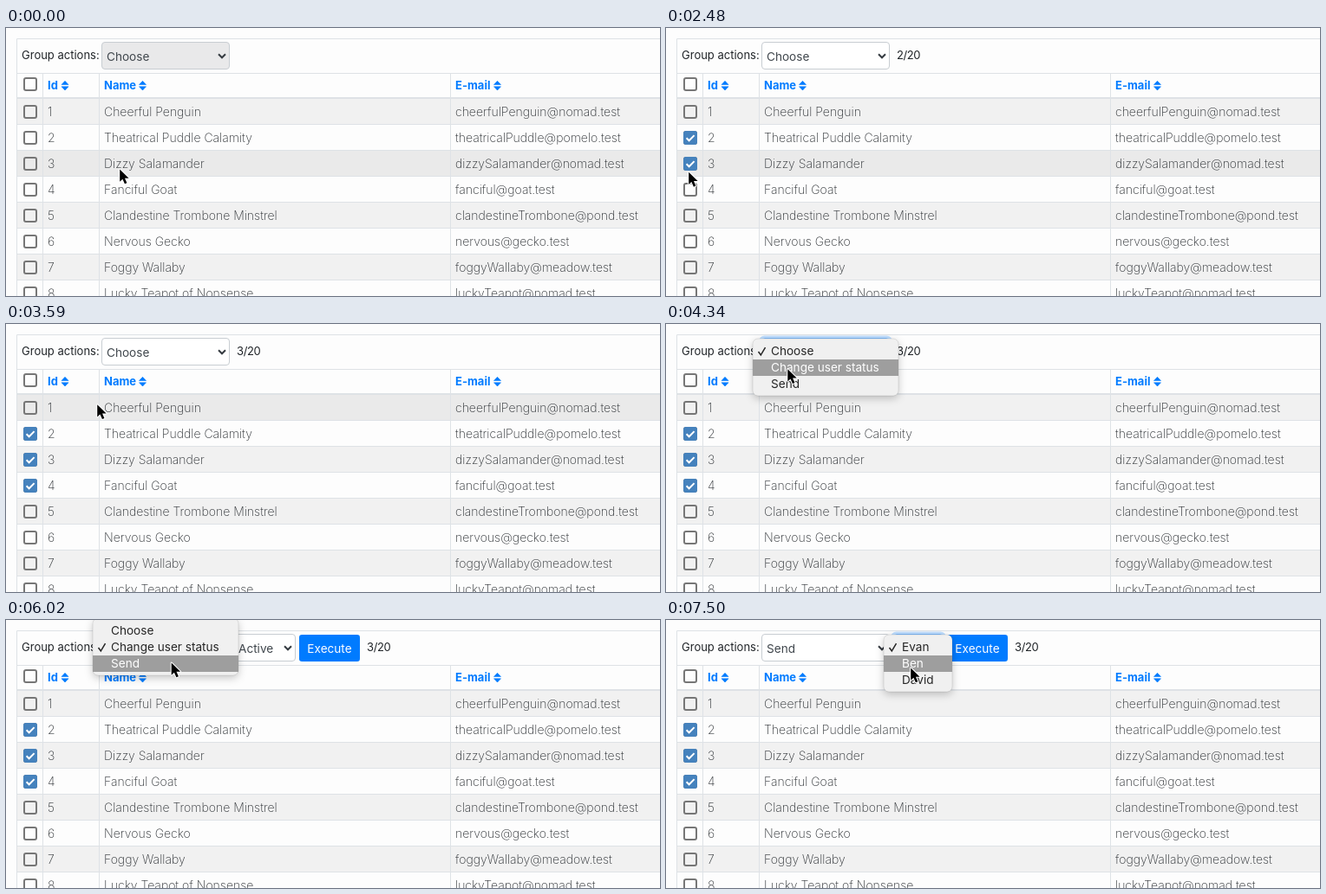
Recreate the animation shown at these times as an HTML page. Size 754 by 310 pixels, loop 8000 ms.

```html
<!DOCTYPE html>
<html lang="en">
<head>
<meta charset="utf-8">
<title>Group actions</title>
<style>
html, body { margin: 0; width: 100%; height: 100%; overflow: hidden; background: #fdfdfd; }
svg { display: block; width: 754px; height: 310px; font: 13.6px Inter, sans-serif; fill: #212529; }
.cell { font-size: 14px; font-weight: 200; fill: #2b2f33; }
.head { font-size: 13px; font-weight: 700; fill: #007bff; }
.label { font-size: 13px; }
.count { font-size: 13px; letter-spacing: -.4px; }
.field { fill: #40474d; }
.menu { filter: drop-shadow(0 3px 5px rgba(0, 0, 0, .22)); }
</style>
</head>
<body>
<svg id="stage" viewBox="0 0 754 310"></svg>
<script>
const LOOP = 8000;
const stage = document.getElementById('stage');

const rows = [
  ['Cheerful Penguin', 'cheerfulPenguin@nomad.test'],
  ['Theatrical Puddle Calamity', 'theatricalPuddle@pomelo.test'],
  ['Dizzy Salamander', 'dizzySalamander@nomad.test'],
  ['Fanciful Goat', 'fanciful@goat.test'],
  ['Clandestine Trombone Minstrel', 'clandestineTrombone@pond.test'],
  ['Nervous Gecko', 'nervous@gecko.test'],
  ['Foggy Wallaby', 'foggyWallaby@meadow.test'],
  ['Lucky Teapot of Nonsense', 'luckyTeapot@nomad.test']
];
const actions = ['Choose', 'Change user status', 'Send'];
const people = ['Evan', 'Ben', 'David'];

// Row index -> time it gets ticked
const ticks = { 1: 1720, 2: 2300, 3: 2890 };

// Pointer moves: start, end, target x, target y
const start = [130, 162.5];
const moves = [
  [660, 1360, 25, 126.5],
  [1850, 2070, 25, 156],
  [2400, 2710, 25, 185],
  [3240, 4000, 152, 36],
  [4110, 4390, 138.5, 52],
  [5150, 5450, 165, 31],
  [5480, 5670, 176, 34],
  [5850, 6020, 189.5, 48.5],
  [6580, 7040, 287, 35],
  [7150, 7500, 281, 54.5]
];

// Menus: open at, chosen at (then blink and fade)
const menus = [
  { open: 4060, pick: 4630, x: 100, y: 17, w: 168, items: actions, checked: 0 },
  { open: 5450, pick: 6260, x: 100, y: -2, w: 168, items: actions, checked: 1 },
  { open: 7090, pick: 1e9, x: 251, y: 17, w: 79, items: people, checked: 0 }
];
const STATUS_AT = 4980, SEND_AT = 6600;

const clamp = v => Math.max(0, Math.min(1, v));
const ease = p => { const q = Math.pow(clamp(p), .7); return q * q * (3 - 2 * q); };

const rect = (x, y, w, h, fill, more = '') =>
  `<rect x="${x}" y="${y}" width="${w}" height="${h}" fill="${fill}" ${more}/>`;
const text = (x, y, str, cls = '', more = '') =>
  `<text x="${x}" y="${y}" class="${cls}" ${more}>${str}</text>`;
const line = (d, color, width, more = '') =>
  `<path d="${d}" fill="none" stroke="${color}" stroke-width="${width}" ${more}/>`;

function pointerAt(t) {
  let [x, y] = start;
  for (const [a, b, tx, ty] of moves) {
    const p = ease((t - a) / (b - a));
    x += (tx - x) * p;
    y += (ty - y) * p;
  }
  return [x, y];
}

function checkbox(y, on) {
  let s = rect(21, y + 1, 14, 14, 'none', 'rx="2" stroke="#767676" stroke-width="2"');
  if (on > 0) {
    s += `<g opacity="${on}">` + rect(20, y, 16, 16, '#4582bd', 'rx="3"') +
      line(`M23.6 ${y + 8.3}l3 3 6-6.2`, '#fff', 2) + '</g>';
  }
  return s;
}

function sortIcon(x) {
  return `<path fill="#007bff" stroke="#007bff" stroke-width=".6" stroke-linejoin="round"
    d="M${x} 65.5l4-4.2 4 4.2zM${x} 67.8h8l-4 4.2z"/>`;
}

function select(x, w, label, enabled, focused) {
  let s = focused
    ? rect(x - 1.5, 15, w + 3, 34, 'none', 'rx="5" stroke="#bfdeff" stroke-width="3"') : '';
  s += rect(x + .5, 16.5, w - 1, 31, enabled ? '#fff' : '#e9e9ea',
    `rx="3.5" stroke="${focused ? '#80bdff' : '#c8cdd2'}"`);
  s += text(x + 6, 38, label, 'field');
  return s + line(`M${x + w - 13} 30.3l4 4 4-4`, '#343a40', 2);
}

function toolbar(t) {
  const ready = t >= STATUS_AT, sent = t >= SEND_AT;
  const action = sent ? 2 : ready ? 1 : 0;
  const count = Object.values(ticks).filter(at => t >= at).length;
  let s = text(18, 36.3, 'Group actions:', 'label');
  s += select(110, 148, actions[action], count > 0, t >= 4060 && t < 7060);
  let x = 258;
  if (ready) {
    const w = sent ? 58 : 72;
    s += select(262, w, sent ? people[0] : 'Active', true, t >= 7090);
    x += w + 8;
    s += rect(x, 17, 70, 31, '#007bff', 'rx="3.2"');
    s += text(x + 35, 38, 'Execute', '', 'text-anchor="middle" style="fill:#fff"');
    x += 70;
  }
  if (count) s += text(x + 8, 36.3, count + '/20', 'count');
  return s;
}

function table(t, py) {
  const hover = py >= 82 ? Math.floor((py - 82) / 30) : -1;
  const grid = '#dee2e6';
  let s = '';
  rows.forEach((r, i) => {
    const y = 82 + 30 * i;
    if (i === hover) s += rect(12, y, 742, 30, '#eaeaea');
    else if (i % 2 === 0) s += rect(12, y, 742, 30, '#f1f1f1');
  });
  s += line('M754 12.5H12.5V310M12 52.5H754M42.5 52V310M107.5 52V310M512.5 52V310', grid, 1);
  s += line('M12 81H754', grid, 2);
  s += checkbox(57, 0);
  s += text(48, 71.3, 'Id', 'head') + sortIcon(64);
  s += text(113, 71.3, 'Name', 'head') + sortIcon(153.5);
  s += text(518, 71.3, 'E-mail', 'head') + sortIcon(562.5);
  rows.forEach(([name, mail], i) => {
    const y = 82 + 30 * i;
    if (i) s += line(`M12 ${y - .5}H754`, grid, 1);
    s += checkbox(y + 7, i in ticks ? clamp((t - ticks[i]) / 150) : 0);
    s += text(48, y + 20, i + 1, 'cell') + text(113, y + 20, name, 'cell') +
      text(518, y + 20, mail, 'cell');
  });
  return s;
}

function menu(m, t, py) {
  const since = t - m.pick;
  const alpha = 1 - clamp((since - 115) / 185);
  if (t < m.open || alpha <= 0) return '';
  const blink = since >= 0 && since < 60;
  const active = Math.floor((py - m.y - 5) / 19);
  let s = `<g class="menu" opacity="${alpha}">` +
    rect(m.x, m.y, m.w, 66, '#f0f0f0', 'rx="6" stroke="#000" stroke-opacity=".16" stroke-width=".6"');
  m.items.forEach((label, i) => {
    const y = m.y + 5 + 19 * i;
    const lit = i === active && !blink;
    const color = lit ? '#fff' : '#262626';
    if (lit) s += rect(m.x, y, m.w, 19, '#9e9e9e');
    if (i === m.checked) s += line(`M${m.x + 6.5} ${y + 10}l2.8 3.8 5.2-8.6`, color, 1.5);
    s += text(m.x + 21, y + 14, label, '', `style="fill:${color}"`);
  });
  return s + '</g>';
}

function pointer(x, y) {
  return `<path transform="translate(${x + .4} ${y})" fill="#000" stroke="#fff" stroke-width="2"
    stroke-linejoin="round" paint-order="stroke"
    d="M.8 1V15.2L4 12.2 6.5 17.8 9 16.7 6.6 11.2H11.2Z"/>`;
}

function draw(t) {
  const [x, y] = pointerAt(t);
  stage.innerHTML = table(t, y) + toolbar(t) +
    menus.map(m => menu(m, t, y)).join('') + pointer(x, y);
}

const begin = performance.now();
function tick() {
  draw((performance.now() - begin) % LOOP);
  requestAnimationFrame(tick);
}
tick();
</script>
</body>
</html>
```
